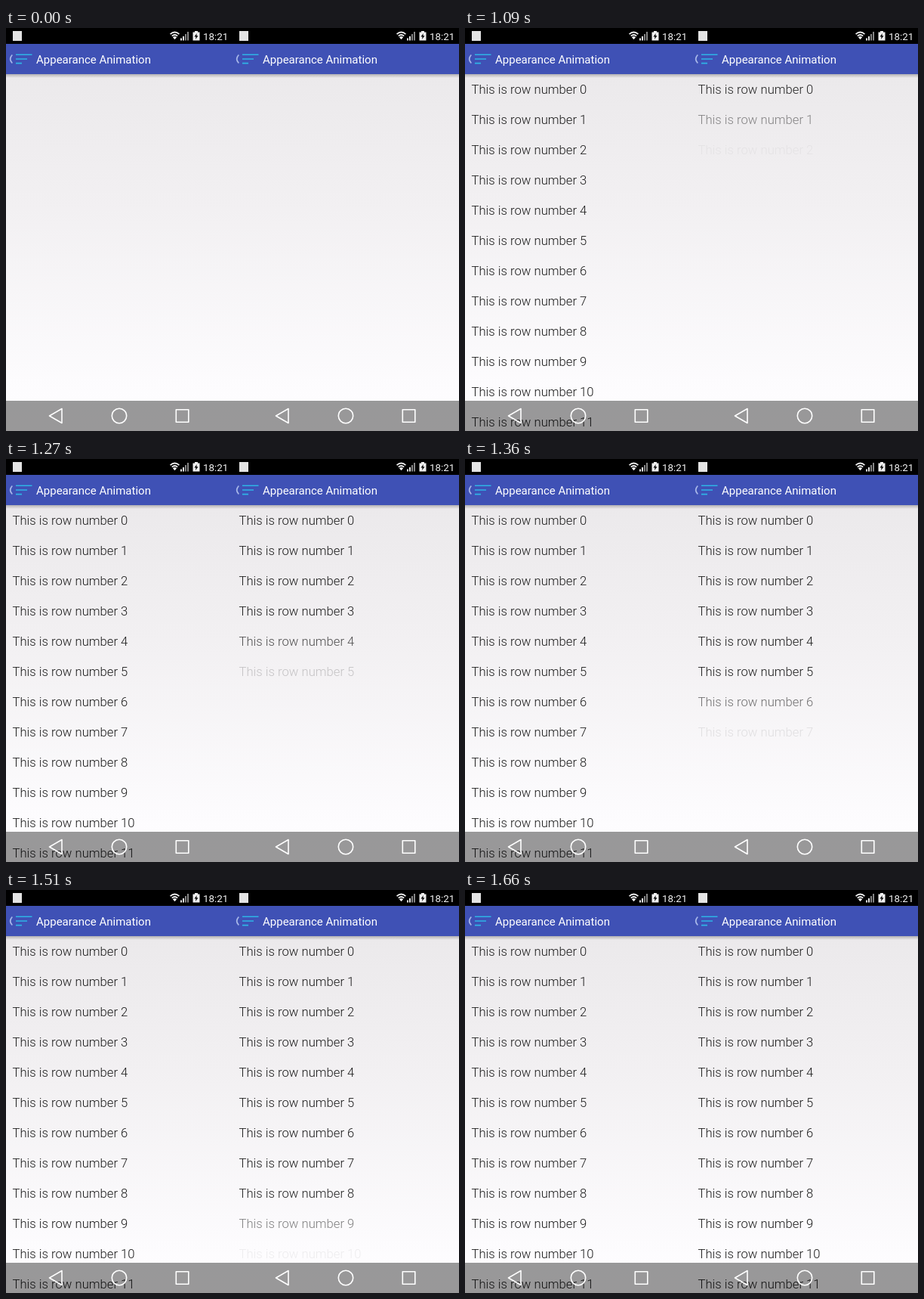
An HTML page for the animation above (2.66 s loop, 600 by 533 pixels).

```html
<!DOCTYPE html>
<html lang="en">
<head>
<meta charset="utf-8">
<title>Appearance Animation</title>
<style>
  html, body { margin: 0; width: 100%; height: 100%; overflow: hidden; background: #fff; }
  svg { display: block; width: 100%; height: 100%; }
  text { font-family: Roboto, "Open Sans", sans-serif; }
  .row { font-size: 16.67px; font-weight: 300; fill: #1c1c1c; }
  .title { font-size: 15px; fill: #fff; }
  .clock { font-size: 13.4px; fill: #f2f2f2; }
</style>
</head>
<body>
<svg viewBox="0 0 600 533" xmlns="http://www.w3.org/2000/svg">
  <defs>
    <linearGradient id="page" x1="0" y1="0" x2="0" y2="1">
      <stop offset="0" stop-color="#e9e7e9"/>
      <stop offset=".45" stop-color="#f2f0f2"/>
      <stop offset=".9" stop-color="#fdfcfe"/>
      <stop offset="1" stop-color="#fefdff"/>
    </linearGradient>
    <linearGradient id="shade" x1="0" y1="0" x2="0" y2="1">
      <stop offset="0" stop-color="#000" stop-opacity=".24"/>
      <stop offset="1" stop-color="#000" stop-opacity="0"/>
    </linearGradient>
    <g id="chrome">
      <rect y="61" width="300" height="5" fill="url(#shade)"/>
      <rect y="21" width="300" height="40" fill="#3f51b5"/>
      <rect width="300" height="21"/>
      <rect x="9" y="4" width="12" height="13" fill="#e4e4e4"/>

      <g fill="none" stroke="#f0f0f0" stroke-width="1.8">
        <path d="M217.6 8.2Q223.5 2.8 229.4 8.2"/>
        <path d="M219.8 10.7Q223.5 7.4 227.2 10.7"/>
        <path d="M221.4 12.2Q223.5 10.6 225.6 12.2L223.5 14.8Z" fill="#f0f0f0" stroke-width="1"/>
      </g>
      <path d="M231 13.5h2v3h-2zM234 11h2v5.500h-2z" fill="#e8e8e8"/>
      <path d="M237 8h2v8.500h-2zM240 5h2v11.500h-2z" fill="#858585"/>
      <path d="M247.500 5.500h2.500V4h4v1.500h2.500v11h-9z" fill="#f0f0f0"/>
      <path d="M252.800 7l-3.300 4.500h2.100l-.6 3.500 3.500-4.700h-2.200z"/>
      <text class="clock" x="261" y="15.500">18:21</text>

      <path d="M8.300 35.500Q3 41 8.300 46.500" fill="none" stroke="#a9b9ea" stroke-width="1.700"/>
      <path d="M13 35.300h21.500M13 41h15M13 46.600h8" stroke="#2fb4e6" stroke-width="1.600"/>
      <text class="title" x="40" y="46.500">Appearance Animation</text>

      <rect y="493" width="300" height="40" fill-opacity=".4"/>
      <g fill="none" stroke="#fff" stroke-width="1.600" stroke-linejoin="round">
        <path d="M57.500 513L74 503.500V522.500Z"/>
        <circle cx="150" cy="513" r="9.700"/>
        <rect x="225.300" y="504.800" width="16.500" height="16.500"/>
      </g>
    </g>
  </defs>
  <rect width="600" height="533" fill="url(#page)"/>
  <g id="left"></g>
  <g id="right" transform="translate(300)"></g>
  <use href="#chrome"/>
  <use href="#chrome" x="300"/>
</svg>
<script>
  const LOOP = 2660, START = 1000, END = 1660, STEP = 30;
  const ROWS = 12, LEAD = 34, STAGGER = 52, FADE = 143;
  const left = document.getElementById('left');
  const right = document.getElementById('right');

  function addRows(group) {
    return Array.from({ length: ROWS }, (_, i) => {
      const text = document.createElementNS('http://www.w3.org/2000/svg', 'text');
      text.setAttribute('class', 'row');
      text.setAttribute('x', 8.5);
      text.setAttribute('y', 87 + i * 40);
      text.textContent = `This is row number ${i}`;
      group.append(text);
      return text;
    });
  }

  addRows(left);
  const fading = addRows(right);

  const clamp = v => Math.min(1, Math.max(0, v));
  const ease = u => (1 - Math.cos(Math.PI * u)) / 2;

  function rowAlpha(i, t) {
    if (t < START) return 0;
    if (t >= END) return 1;
    const held = Math.floor((t - START) / STEP) * STEP;
    return ease(clamp((held + LEAD - i * STAGGER) / FADE));
  }

  function render(t) {
    left.setAttribute('opacity', t < START ? 0 : 1);
    fading.forEach((row, i) => row.setAttribute('opacity', rowAlpha(i, t)));
  }

  const origin = performance.now();
  function tick() {
    render((performance.now() - origin) % LOOP);
    requestAnimationFrame(tick);
  }
  tick();
</script>
</body>
</html>
```
